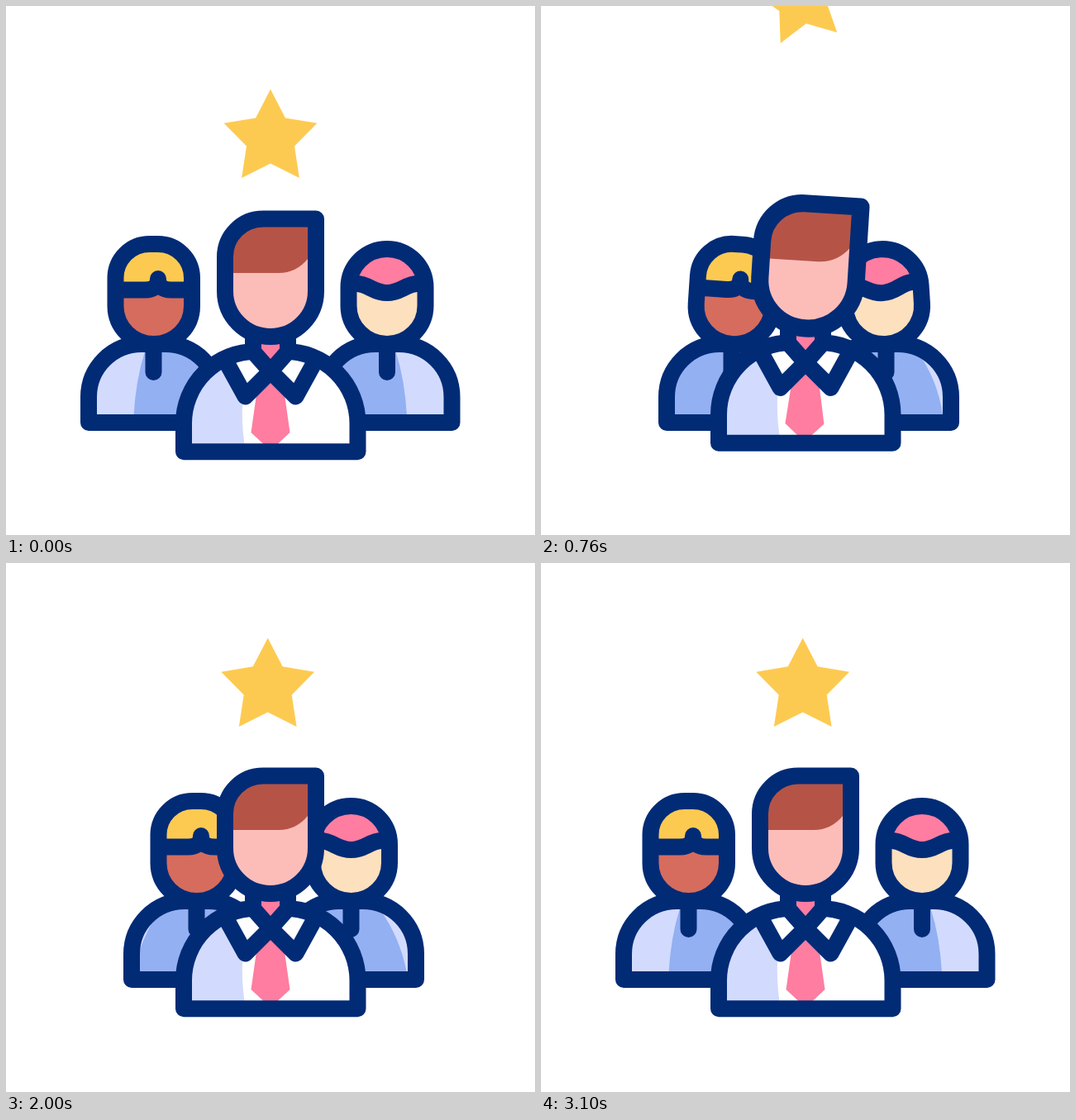
Animation, 640 px wide and 640 px high, one loop 3.22 s. Source, as an HTML page with a canvas:

```html
<!DOCTYPE html>
<html lang="en">
<head>
<meta charset="utf-8">
<title>Team leader</title>
<style>
  html, body { margin: 0; width: 100%; height: 100%; overflow: hidden; background: #fff; }
  canvas { display: block; width: 640px; height: 640px; }
</style>
</head>
<body>
<canvas id="stage" width="640" height="640"></canvas>
<script>
const LOOP = 3220;
const NAVY = '#022b76', YELLOW = '#fdca51', PINK = '#fe7da0';
const LIGHT = '#d2dbfd', BLUE = '#93b0f2';
const ctx = document.getElementById('stage').getContext('2d');
const path = d => new Path2D(d);

// Tables of [time, value], eased with a half cosine between entries.
const moves = {
  bob: [[0, 0], [370, 10.8], [440, 10.8], [780, -10.8], [1100, 0]],
  headScale: [[560, 1], [880, 1.085], [1540, 1.085], [1960, 1]],
  headTilt: [[440, 0], [760, 3.6], [1120, -1.2], [1460, 0.6], [1660, 0]],
  tieTilt: [[0, 0], [320, -7], [760, 1], [1100, -0.5], [1440, 0]],
  leftTilt: [[0, 0], [300, -6], [760, 3.8], [1100, -0.5], [1440, 0],
             [2000, 0], [2310, 5.5], [2760, -3.5], [3080, 0]],
  rightTilt: [[0, 0], [300, 5.6], [760, -3.6], [1100, 0.5], [1440, 0],
              [2000, 0], [2310, -5], [2600, 1], [3080, 0]],
  starY: [[880, -54], [1080, 174.5], [1620, 154.5]],
  starTurn: [[880, 78], [1080, 132], [1620, 144]]
};

function at(keys, t) {
  if (t <= keys[0][0]) return keys[0][1];
  for (let i = 1; i < keys.length; i++) {
    const [t0, v0] = keys[i - 1], [t1, v1] = keys[i];
    if (t < t1) return v0 + (v1 - v0) * (1 - Math.cos(Math.PI * (t - t0) / (t1 - t0))) / 2;
  }
  return keys[keys.length - 1][1];
}

// cubic-bezier(.33, 0, .2, 1)
function glide(x) {
  if (x <= 0) return 0;
  if (x >= 1) return 1;
  let lo = 0, hi = 1, u;
  for (let i = 0; i < 24; i++) {
    u = (lo + hi) / 2;
    const v = 1 - u;
    if (0.99 * u * v * v + 0.6 * u * u * v + u * u * u < x) lo = u; else hi = u;
  }
  return u * u * (3 - 2 * u);
}

function fill(shape, color) {
  ctx.fillStyle = color;
  ctx.fill(shape);
}

function line(shape) {
  ctx.strokeStyle = NAVY;
  ctx.lineWidth = 20;
  ctx.lineJoin = ctx.lineCap = 'round';
  ctx.stroke(shape);
}

function scoped(draw) {
  ctx.save();
  draw();
  ctx.restore();
}

function pivot(x, y, deg, scale = 1) {
  ctx.translate(x, y);
  ctx.rotate(deg * Math.PI / 180);
  ctx.scale(scale, scale);
  ctx.translate(-x, -y);
}

// Fills an outline with clipped parts, then draws the outline over them.
function inked(outline, base, parts) {
  fill(outline, base);
  scoped(() => {
    ctx.clip(outline);
    parts();
  });
  line(outline);
}

// Turns about the middle of its height, slightly above its centroid.
const star = new Path2D();
for (let i = 0; i < 10; i++) {
  const r = i % 2 ? 30.5 : 59.3, a = i * Math.PI / 5;
  star.lineTo(r * Math.sin(a), 5.6 - r * Math.cos(a));
}
star.closePath();

const sideBody = path('M-78.5 504V473A64 64 0 0 1-14.5 409H14.5A64 64 0 0 1 78.5 473V504Z');
const zip = path('M0 409V443');

const left = {
  x: 178.5, sign: 1, reach: 52, tilt: moves.leftTilt,
  head: path('M132.5 329A41 41 0 0 1 173.5 288H184A41 41 0 0 1 225 329V363A46.25 46 0 0 1 132.5 363Z'),
  hair: path('M125 280H235V344H125Z'),
  fringe: path('M132.5 343.5H168Q184 343.5 184 330Q184 343.5 200 343.5H225'),
  skin: '#d66c5d', hairColor: YELLOW
};
const right = {
  x: 461, sign: -1, reach: -43.5, tilt: moves.rightTilt,
  head: path('M414.5 340.5A46.5 46.5 0 0 1 507.5 340.5V362.5A46.5 46.5 0 0 1 414.5 362.5Z'),
  hair: path('M404 280H518V335H508C481 335 480 347 461 347S441 335 414 335H404Z'),
  fringe: path('M414.5 335C441 335 442 347 461 347S481 335 507.5 335'),
  skin: '#fde0bd', hairColor: PINK
};

// The shade edge nearly stays in place while the body slides past it.
function shade(p, k, shift, tilt) {
  const lag = -tilt;
  const top = p.sign * (-10.5 + 20 * k) + lag - shift;
  const mid = p.sign * (-21.5 + 6 * k) + lag - shift;
  const low = p.sign * -24 + lag / 3 - shift;
  const far = p.sign * 120;
  return path(`M${top} 418Q${mid} 452 ${low} 496V510H${far}V400H${top}Z`);
}

function drawSide(p, t, k) {
  const shift = p.reach * k, tilt = at(p.tilt, t);
  scoped(() => {
    ctx.translate(p.x + shift, 0);
    inked(sideBody, LIGHT, () => fill(shade(p, k, shift, tilt), BLUE));
    line(zip);
  });
  scoped(() => {
    ctx.translate(shift, 0);
    pivot(p.x, 410, tilt);
    inked(p.head, p.skin, () => {
      fill(p.hair, p.hairColor);
      line(p.fringe);
    });
  });
}

const body = path('M215 539.3V505A87 87 0 0 1 302 418H338A87 87 0 0 1 425.5 505V539.3Z');
const bodyShade = path('M205 410H300Q278 470 290 540H205Z');
const tie = path('M320 445L337 470L343.5 516L320 538L296.5 516L303 470Z');
const knot = path('M309 398H331V416L320 430L309 416Z');
const neck = path('M299 398V414M341 398V414');
const collarFill = path('M265 418L289.5 472.5L320 442L298 417ZM375 418L350.5 472.5L320 442L342 417Z');
const collarLines = path('M265 428L289.5 472.5L320 442L298 417M375 428L350.5 472.5L320 442L342 417');
const head = path('M375 257.5H311A46 46 0 0 0 265 303.5V345A55 55 0 0 0 375 345Z');
const hair = path('M255 247H385V280L365 306Q351 323 330 323H255Z');

function drawLeader(t) {
  scoped(() => {
    ctx.translate(0, at(moves.bob, t));
    inked(body, '#fff', () => {
      fill(bodyShade, LIGHT);
      scoped(() => {
        pivot(320, 455, at(moves.tieTilt, t));
        fill(tie, PINK);
      });
      fill(collarFill, '#fff');
    });
    fill(knot, PINK);
    line(neck);
    line(collarLines);
    pivot(320, 390, at(moves.headTilt, t), at(moves.headScale, t));
    inked(head, '#fcbdb9', () => fill(hair, '#b55446'));
  });
}

function drawStar(t) {
  const rise = Math.pow(t / 760, 1.61);
  const y = t < 880 ? 154.5 - 165.5 * rise : at(moves.starY, t);
  const turn = t < 880 ? 61.2 * rise : at(moves.starTurn, t);
  scoped(() => {
    ctx.translate(320, y);
    ctx.rotate(turn * Math.PI / 180);
    fill(star, YELLOW);
  });
}

function draw(t) {
  const k = glide(t / 620) - glide((t - 2000) / 680);
  ctx.fillStyle = '#fff';
  ctx.fillRect(0, 0, 640, 640);
  drawStar(t);
  drawSide(left, t, k);
  drawSide(right, t, k);
  drawLeader(t);
}

const start = performance.now();
function tick() {
  draw((performance.now() - start) % LOOP);
  requestAnimationFrame(tick);
}
tick();
</script>
</body>
</html>
```
